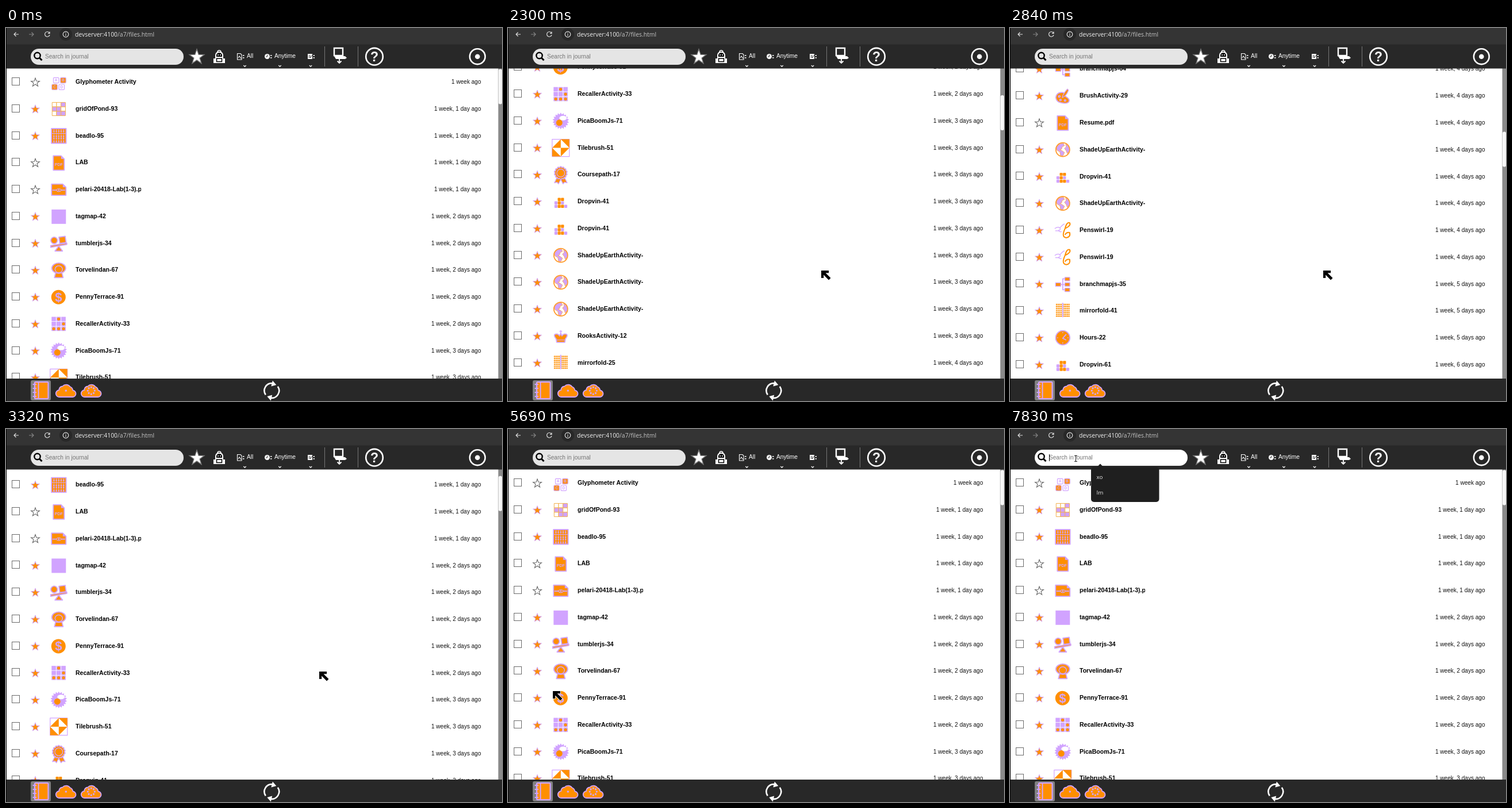
An HTML page for the animation above (8000 ms loop, 863 by 649 pixels).

```html
<!DOCTYPE html>
<html lang="en">
<head>
<meta charset="utf-8">
<title>Journal</title>
<style>
html, body { margin: 0; width: 100%; height: 100%; overflow: hidden; background: #fff; }
svg { display: block; }
text { font-family: "Liberation Sans", Arial, sans-serif; }
.duo { fill: #ff8f00; stroke: #d1a3ff; stroke-width: 1.8; stroke-linejoin: round; }
.lilac { fill: #d1a3ff; stroke: none; }
.orange { fill: #ff8f00; stroke: none; }
.white { fill: #fff; }
.line { fill: none; }
.name { font-size: 10.56px; font-weight: bold; }
.date { font-size: 10.05px; text-anchor: end; fill: #111; }
.label { font-size: 10.2px; fill: #fff; stroke: none; }
.tool { fill: none; stroke: #fff; stroke-width: 2.6; }
</style>
</head>
<body>
<svg id="stage" width="863" height="649" viewBox="0 0 863 649"></svg>
<script>
const LOOP = 8000, ROW = 46.76, STEP = 68.8;

// Shape helpers
const box = (x, y, w, h, attr = '') => `<rect x="${x}" y="${y}" width="${w}" height="${h}" ${attr}/>`;
const disc = (x, y, r, attr = '') => `<circle cx="${x}" cy="${y}" r="${r}" ${attr}/>`;
const oval = (x, y, rx, ry, attr = '') => `<ellipse cx="${x}" cy="${y}" rx="${rx}" ry="${ry}" ${attr}/>`;
const path = (d, attr = '') => `<path d="${d}" ${attr}/>`;
const text = (x, y, s, attr = '') => `<text x="${x}" y="${y}" ${attr}>${s}</text>`;
const at = (x, y, body, attr = '') => `<g transform="translate(${x} ${y})" ${attr}>${body}</g>`;
const cls = c => `class="${c}"`;
const times = (n, f) => Array.from({ length: n }, (_, i) => f(i)).join('');
const grid = (cols, rows, f) => times(cols * rows, i => f(i % cols, Math.floor(i / cols), i));

// Alternating outer and inner radius: stars and bursts
const burst = (points, outer, inner, attr = '') => {
  const list = Array.from({ length: points * 2 }, (_, i) => {
    const a = Math.PI * (i / points - 0.5), r = i % 2 ? inner : outer;
    return `${(r * Math.cos(a)).toFixed(2)},${(r * Math.sin(a)).toFixed(2)}`;
  });
  return `<polygon points="${list.join(' ')}" ${attr}/>`;
};

const block = (x, y, letter, filled) =>
  box(x, y, 9.4, 9.4, `rx="1.5" stroke-width="1.2" fill="${filled ? '#ff8f00' : '#fff'}"`) +
  text(x + 4.7, y + 7.1, letter, 'class="lilac" font-size="6.6" font-weight="bold" text-anchor="middle"');
const brickColours = '.oo.lol.lool';

const icons = {
  blocks: block(-9.3, -7.7, 'A') + block(3, -7.7, 'B', 1) + block(-12, 4, 'C', 1) + block(.3, 4, 'D'),
  cells: grid(3, 3, (x, y, i) => box(-11.5 + x * 7.7, -11.3 + y * 7.7, 7.7, 7.7,
    `fill="${'001110011'[i] > 0 ? '#d1a3ff' : '#fff'}" stroke="#f3b04d" stroke-width="1"`)),
  beads: box(-12.7, -12.5, 25.5, 25.5) +
    times(5, i => path(`M${-8.4 + i * 4.2}-12V13`, 'stroke-width=".8"')) + path('M-12-4H12', 'stroke-width="1"') +
    grid(5, 4, (x, y) => disc(-8.4 + x * 4.2, [-8, 1, 4.5, 10][y], 1.3, cls('lilac'))),
  pdf: path('M-9.5-12H4L9.5-6.5V13H-9.5Z') + path('M4-12V-6.5H9.5Z', cls('lilac')) +
    text(0, 6, 'PDF', 'class="lilac" font-size="7" font-weight="bold" text-anchor="middle"'),
  file: path('M-12.5-9.5H7L12.5-4V10H-12.5Z') + path('M7-9.5V-4H12.5Z', cls('lilac')) + path('M-11 1H-5M5 1H11', cls('line')) +
    path('M-5 1Q0-4 5 1Q0 6-5 1Z', 'class="line" stroke-width="1.2"') + disc(0, 1, 1.3, cls('lilac')),
  plain: box(-12.5, -12, 25, 25, cls('lilac')),
  balance: disc(-8, -5, 5.7) + box(1, -11.5, 11, 11, 'transform="rotate(-8 7 -6)"') +
    path('M-14 4L14-.5V2L-14 7Z') + path('M0 5L6.5 13.5H-6.5Z'),
  figure: path('M-5 3H5L7.5 13H-7.5Z') + oval(0, -3.5, 12, 9) + oval(0, -1.5, 6.5, 6, 'class="line" stroke-width="1.5"'),
  coin: disc(-.5, .2, 12.5, cls('orange')) +
    text(-.5, 7.6, '$', 'class="lilac" font-size="22" font-weight="bold" text-anchor="middle"'),
  memory: grid(3, 3, (x, y, i) => box(-12.5 + x * 8.5, -12.3 + y * 8.5, 7.6, 7.6, cls('lilac')) +
    ('010001111'[i] > 0 ? disc(-8.7 + x * 8.5, -8.5 + y * 8.5, 2.6, cls('orange')) : '')),
  badge: burst(18, 14.5, 11.5, cls('lilac')) + oval(4, -5, 6.5, 4, 'fill="#fff" stroke="none"') +
    disc(-2.5, 3, 5.5, cls('orange')),
  tiles: box(-15, -15, 30, 30, 'fill="#fff" stroke-width="1.2"') +
    path('M-15 0L0-15V0ZM0-15H15V0ZM15 0L0 15V0ZM0 15H-15V0Z', cls('orange')),
  rosette: path('M-6 4L-11 14L-6.5 13L-4 16L0 8L4 16L6.5 13L11 14L6 4Z', 'stroke-width="1.4"') +
    at(0, -3, burst(14, 11.3, 9.8) + disc(0, 0, 6.8, 'stroke-width="1.3"')),
  bricks: grid(4, 3, (x, y, i) => brickColours[i] === '.' ? '' :
    box(-11 + x * 5.7, -6.5 + y * 6, 5.2, 5.4, `rx="1" ${cls(brickColours[i] === 'o' ? 'orange' : 'lilac')}`)),
  globe: disc(0, 0, 12, 'fill="#fff" stroke="#ff9a2a"') +
    path('M-11-3Q-8-11 1-11L3-7L-1-5L-2-1L-5 0L-1 2L3 5L0 11L-4 10L-5 4L-10 1ZM5-10Q12-6 11.5 2L8 7L6 2L3-2L6-5Z',
      'stroke="#ff9a2a" stroke-width=".7" fill="#d1a3ff"'),
  crown: path('M-7 11H7L8 5Q13-1 10-3Q5-5 2 0L0-5L-2 0Q-5-5-10-3Q-13-1-8 5Z') +
    path('M0-10V-4M-2.5-8H2.5M-7 7H7', 'class="line" stroke-width="1.4"'),
  mirror: grid(8, 7, (x, y) => disc(-10.8 + x * 2.75 + (x > 3 ? 2.4 : 0), -11.3 + y * 3.4, 1.2, cls('orange'))) +
    path('M0-14V11', 'class="line" stroke-width="2"'),
  tree: path('M-5 1H0M4-9H0V10H4M0 1H4', cls('line')) +
    box(-12.5, -2, 9, 6, 'stroke-width="1.3"') + times(3, i => box(3.7, -11.5 + i * 9.3, 8.5, 6, 'stroke-width="1.3"')),
  palette: path('M-12 3Q-11-6-2-6Q4-6 4-2Q4 1 8 3Q13 7 10 11Q6 14-2 12Q-11 11-12 3Z') +
    disc(-6, 1, 2.4, cls('lilac')) + disc(-4, 7, 2.2, cls('lilac')) + disc(4, 8, 2.2, cls('lilac')) +
    path('M-1 3Q0-3 8-12L10-10Q6 1-1 3Z', 'stroke-width="1.4"'),
  script: path('M-14-3Q-8-7-5-4Q0-10 3-11M-13 1H-7L-4 3M-5-4Q-3-1-7 0Q-5 4-2 2', 'class="line" stroke-width="1.2"') +
    path('M4-3Q15-8 12-13Q7-15 4-3Q-3 12 6 13Q14 12 12 4Q6 3 4 8', 'fill="none" stroke="#ff8f00" stroke-width="2"'),
  clock: disc(0, 0, 12.3) + path('M6-6L0 1L6 4', 'class="line" stroke-width="2"') +
    times(4, i => path('M0-10V-8', `transform="rotate(${i * 90})" stroke-width="1.4"`)),
};

// name, icon, days past one week, "-" when not starred
const entries = `Glyphometer Activity,blocks,0,-
gridOfPond-93,cells,1
beadlo-95,beads,1
LAB,pdf,1,-
pelari-20418-Lab(1-3).pdf,file,1,-
tagmap-42,plain,2
tumblerjs-34,balance,2
Torvelindan-67,figure,2
PennyTerrace-91,coin,2
RecallerActivity-33,memory,2
PicaBoomJs-71,badge,3
Tilebrush-51,tiles,3
Coursepath-17,rosette,3
Dropvin-41,bricks,3
Dropvin-41,bricks,3
ShadeUpEarthActivity-58,globe,3
ShadeUpEarthActivity-58,globe,3
ShadeUpEarthActivity-58,globe,3
RooksActivity-12,crown,3
mirrorfold-25,mirror,4
branchmapjs-64,tree,4
BrushActivity-29,palette,4
Resume.pdf,pdf,4,-
ShadeUpEarthActivity-58,globe,4
Dropvin-41,bricks,4
ShadeUpEarthActivity-58,globe,4
Penswirl-19,script,4
Penswirl-19,script,4
branchmapjs-35,tree,5
mirrorfold-41,mirror,5
Hours-22,clock,5
Dropvin-61,bricks,6`.split('\n').map(line => line.split(','));

const row = ([name, icon, days, plain], i) => {
  const age = days > 0 ? `1 week, ${days} day${days > 1 ? 's' : ''} ago` : '1 week ago';
  return at(0, 93.5 + i * ROW,
    box(10.5, -7, 13, 13, 'fill="#fff" stroke="#6b6b6b" shape-rendering="crispEdges"') +
    at(51, 1.3, burst(5, 7.8, 3.2, plain ? 'fill="#fff" stroke="#666" stroke-width="1.1"' : 'class="duo" style="stroke-width:1"')) +
    at(91.8, .5, icons[icon], cls('duo')) +
    text(121, 3.6, name, 'class="name" clip-path="url(#nameClip)"') +
    text(826.5, 3.6, age, cls('date')));
};

const browserBar = box(0, 0, 863, 29, 'fill="#343434"') +
  `<g fill="none" stroke="#dedede" stroke-width="1.2">` +
  path('M22 11H14M17.5 7.5L14 11L17.5 14.5') +
  path('M40 11H48M44.5 7.5L48 11L44.5 14.5', 'stroke="#858585"') +
  path('M75.5 8.5A4.3 4.3 0 1 0 76 12M76 6.5V9.3H73') +
  disc(104, 11, 11, 'fill="#282828" stroke="none"') + disc(104, 11, 4.8) + path('M104 10.4V13.8M104 8V9.3') + '</g>' +
  text(120, 15, 'devserver:4100<tspan fill="#c4c4c4">/a7/files.html</tspan>',
    `fill="#eee" style="font:10.4px 'Open Sans','Noto Sans',sans-serif"`);

const backpack = path('M-3-8Q-3-11 0-11Q3-11 3-8', 'fill="none" stroke="#fff" stroke-width="1.6"') +
  path('M-7 11V-2Q-7-9 0-9Q7-9 7-2V11ZM-10 3H-7V11H-10ZM10 3H7V11H10Z', cls('white')) +
  path('M-5-3Q-4-7 0-7Q4-7 5-3V0H-5Z') + box(-2.8, -4, 1.8, 1.8, cls('white')) + box(1, -4, 1.8, 1.8, cls('white')) +
  path('M-4.5 3H4.5V8.5H-4.5Z', 'fill="#fff" stroke="#000" stroke-width="1.5"');

const toolbar = box(0, 28.5, 863, 42, 'fill="#282828"') +
  box(43, 36, 266, 28, 'id="field" rx="14"') +
  disc(54.5, 48, 5.2, 'fill="none" stroke="#000" stroke-width="2.4"') + path('M58.3 52L62.5 56.2', 'stroke="#000" stroke-width="3"') +
  text(68, 53, 'Search in journal', 'font-size="10.1" fill="#757575"') +
  path('M68.5 44V56', 'id="caret" stroke="#000"') +
  at(332, 50.5, burst(5, 13.5, 5.4, 'fill="#fff" stroke="#777" stroke-width="1.4"')) +
  at(371, 50, backpack) +
  path('M402.5 44.5H408L410 46.5V55H402.5ZM404 52L406 49L409 53', 'fill="none" stroke="#fff" stroke-width="1.1"') +
  disc(454.5, 49.5, 4.5, cls('white')) + path('M454.5 46.5V50H452', 'fill="none" stroke="#282828"') +
  box(525, 45, 8, 9, cls('white')) + path('M526.5 48H530M526.5 50.5H530M529 52L534 46', 'stroke="#282828"') +
  [412, 460, 534.5].map(x => box(x, 47, 2.5, 1.6, cls('white')) + box(x, 51, 2.5, 1.6, cls('white'))).join('') +
  text(419, 51.5, 'All', cls('label')) + text(467, 51.5, 'Anytime', cls('label')) +
  [415.5, 476.5, 530].map(x => path(`M${x - 2.2} 65L${x} 67.2L${x + 2.2} 65`, 'fill="none" stroke="#fff" stroke-width="1.3"')).join('') +
  path('M554.5 32V67M612.5 32V67', 'stroke="#777"') +
  at(580, 48, path('M-9-13H6V0H-9Z', 'class="tool" style="stroke-width:2.4"') +
    path('M-9 1H10L13 4L10 6H-6Z', cls('white')) + path('M0 6V12M-3.5 9.5L0 13L3.5 9.5', 'class="tool" style="stroke-width:1.8"')) +
  disc(641, 49.7, 14.8, cls('tool')) + text(641, 58, '?', 'font-size="23" font-weight="bold" fill="#fff" text-anchor="middle"') +
  disc(820.3, 49.7, 13.4, cls('tool')) + disc(820.3, 49.7, 4.3, cls('white'));

const cloud = inner => path('M-11 11H11A5.7 5.7 0 0 0 12-.5A8 8 0 0 0 7-7A8.5 8.5 0 0 0-6-7.5A6 6 0 0 0-12-1A6 6 0 0 0-11 11Z') + inner;
const halfTurn = path('M-6.5 11A12.8 12.8 0 0 1-4-12.2', cls('tool')) + path('M-6-16.5L3-12.5L-4-6.5Z', cls('white'));

const bottomBar = box(0, 610, 863, 39, 'fill="#282828"') + box(43, 613, 35, 35, 'rx="3" fill="#808080"') +
  `<g class="duo">` + box(50, 616, 23.5, 29, 'rx="1.5" stroke-width="2.2"') + path('M56.5 617V644', 'stroke-width="2"') +
  times(4, i => path(`M46.5 ${620 + i * 7}H53`, 'stroke-width="2"')) +
  at(104.3, 631, cloud(disc(0, 0, 1.8, cls('lilac')))) +
  at(148.3, 631, cloud(times(8, i => disc(0, -6, 1.6, `class="lilac" transform="rotate(${i * 45})"`)))) + '</g>' +
  at(462.3, 631, [25, 205].map(a => `<g transform="rotate(${a})">${halfTurn}</g>`).join(''));

const $ = id => document.getElementById(id);
$('stage').innerHTML = `<clipPath id="nameClip">${box(121, -20, 114, 40)}</clipPath>` +
  box(0, 0, 863, 649, cls('white')) + `<g id="list">${entries.map(row).join('')}</g>` +
  box(856.5, 70, 6.5, 540, 'fill="#8a8a8a"') + box(857, 71.5, 6, 61, 'id="thumb" rx="2.5" fill="#f6f6f6"') +
  browserBar + toolbar + bottomBar + box(0, 0, 1, 649, 'fill="#000"') +
  `<g id="menu">` + path('M151 66.5L157 60.5L163 66.5Z', 'fill="#1f1f1f"') + box(141, 66, 118.5, 61, 'rx="5" fill="#1f1f1f"') +
  ['xo', 'Im'].map((s, i) => text(150.5, 86.5 + i * 27, s, `fill="#eee" style="font:9.8px 'Open Sans',sans-serif"`)).join('') + '</g>' +
  path('M112 46.5H117M114.5 46.5V56.5M112 56.5H117', 'id="beam" fill="none" stroke="#222"') +
  path('M0 0H13V4.2H7.6L16.5 13L13 16.5L4.2 7.6V13H0Z', 'id="arrow" stroke="#fff" stroke-width="1.6" paint-order="stroke"');

const scrollKeys = [[0, 0], [1874, 0], [1875, 17], [1944, 72], [2288, 400], [2769, 925], [2838, 958],
  [2907, 900], [3320, 90], [3389, 30], [3526, 0], [LOOP, 0]];
const arrowKeys = [[0, 711, 566], [589, 711, 566], [590, 545, 422], [3457, 545, 422], [3800, 260, 540],
  [4070, 67, 610], [4145, 121, 647], [4759, 121, 647], [4760, 75, 647], [5689, 75, 647], [5690, 78, 456],
  [5830, 67, 420], [6200, 122, 200], [6430, 127, 70], [LOOP, 115, 50]];

// Linear value between the keys around t
const sample = (keys, t) => {
  const i = Math.max(1, keys.findIndex(k => k[0] > t)), a = keys[i - 1], b = keys[i];
  const p = (t - a[0]) / (b[0] - a[0]);
  return a.slice(1).map((v, j) => v + (b[j + 1] - v) * p);
};

const snap = (t, start) => start + Math.floor((t - start) / STEP) * STEP;
const stepped = t => t >= 5690 ? snap(t, 5690) : t >= 1875 && t < 4250 ? snap(t, 1875) : t;
const show = (id, opacity) => $(id).setAttribute('opacity', +opacity);
const move = (id, x, y) => $(id).setAttribute('transform', `translate(${x} ${y})`);

function draw() {
  const t = performance.now() % LOOP, s = stepped(t);
  const [scroll] = sample(scrollKeys, s);
  move('list', 0, -scroll);
  move('thumb', 0, scroll * 0.1137);
  move('arrow', ...sample(arrowKeys, s));
  show('arrow', t >= 520 && t < 6490);
  show('beam', t >= 6560);
  show('caret', t >= 6760 && (t < 7280 || t >= 7830));
  show('menu', t < 6830 ? 0 : t < 6950 ? 0.6 : 1);
  $('field').setAttribute('fill', t < 6760 ? '#e5e5e5' : '#fff');
  requestAnimationFrame(draw);
}
draw();
</script>
</body>
</html>
```
